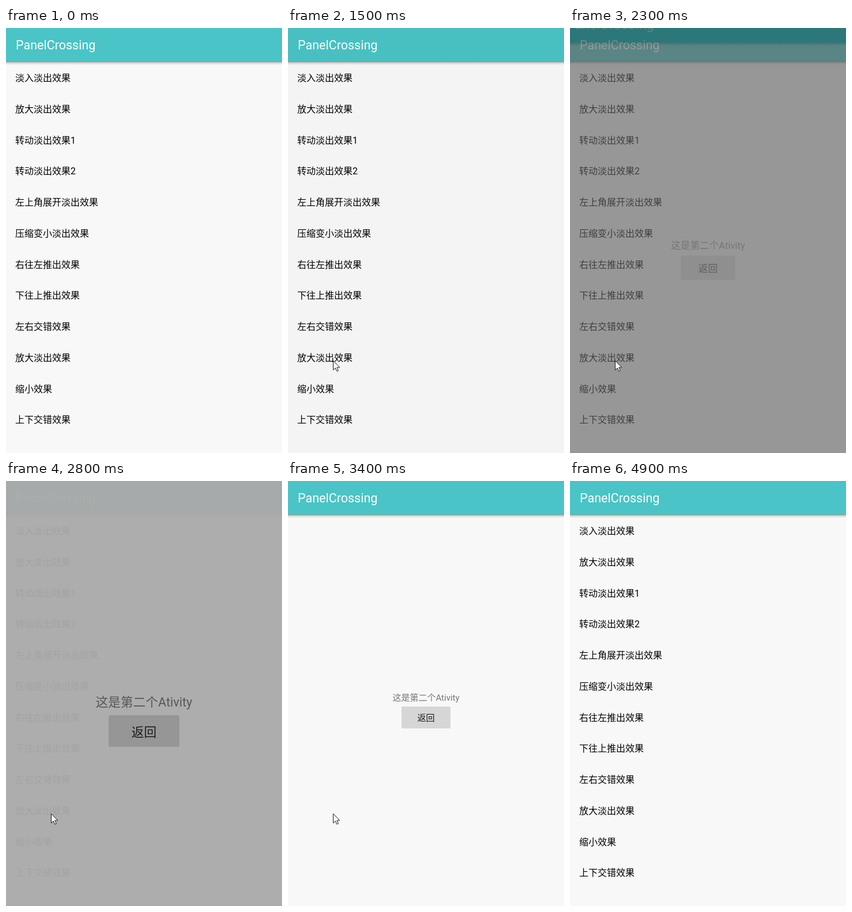
Animation of 479 by 735 pixels, one loop 5300 ms. Source, as an HTML page:

```html
<!DOCTYPE html>
<html lang="zh-CN">
<head>
<meta charset="utf-8">
<title>PanelCrossing</title>
<style>
  html, body { margin: 0; width: 100%; height: 100%; overflow: hidden; background: #000; }
  svg { display: block; width: 479px; height: 735px; }
  text { font-family: Roboto, "Noto Sans CJK SC", "Noto Sans CJK", sans-serif; white-space: pre; }
  .title { font-size: 21.5px; fill: #fff; }
  .item { font-size: 16px; fill: #000; }
  .note { font-size: 15px; fill: #757575; text-anchor: middle; }
  .label { font-size: 15px; font-weight: 500; fill: #1c1c1c; text-anchor: middle; }
</style>
</head>
<body>
<svg viewBox="0 0 479 735">
  <defs>
    <linearGradient id="shade" x2="0" y2="1">
      <stop offset="0" stop-opacity=".47"/>
      <stop offset=".3" stop-opacity=".16"/>
      <stop offset="1" stop-opacity="0"/>
    </linearGradient>
    <g id="frame">
      <rect y="-22" width="479" height="757" fill="#f8f8f8"/>
      <rect y="58" width="479" height="6" fill="url(#shade)"/>
      <rect y="-22" width="479" height="80" fill="#4ac4c6"/>
      <text class="title" x="17" y="37">PanelCrossing</text>
    </g>
  </defs>
  <rect width="479" height="735" fill="#000"/>
  <g id="list"><use href="#frame"/></g>
  <g id="detail">
    <use href="#frame"/>
    <text class="note" x="239.5" y="379.6">这是第二个Ativity</text>
    <rect id="button" x="197" y="390" width="85" height="38" rx="2"/>
    <text class="label" x="239.5" y="415.4">返回</text>
  </g>
  <path id="cursor" d="M.5 .5V16.5L4.2 13L6.8 18.6L9.3 17.5L6.8 12H11.8Z" fill="#fff" stroke="#16162c"/>
</svg>
<script>
const LOOP = 5300, STEP = 100;
const OPENED = 3300, PRESSED = 4200, CLOSING = 4300, CLOSED = 4900;
const $ = id => document.getElementById(id);
const list = $('list'), detail = $('detail'), button = $('button'), cursor = $('cursor');

const items = ['淡入淡出效果', '放大淡出效果', '转动淡出效果1', '转动淡出效果2',
  '左上角展开淡出效果', '压缩变小淡出效果', '右往左推出效果', '下往上推出效果',
  '左右交错效果', '放大淡出效果', '缩小效果', '上下交错效果'];

items.forEach((label, i) => {
  const row = document.createElementNS('http://www.w3.org/2000/svg', 'text');
  row.setAttribute('class', 'item');
  row.setAttribute('x', 16);
  row.setAttribute('y', Math.round(92 + 53.75 * i));
  row.textContent = label;
  list.append(row);
});

// Progress from 0 to 1 between two times
const span = (t, from, to) => Math.min(1, Math.max(0, (t - from) / (to - from)));
const mix = (a, b, p) => a + (b - a) * p;
const easeIn = p => p * p;
const easeOut = p => 1 - (1 - p) ** 2;
const easeInOut = p => (1 - Math.cos(Math.PI * p)) / 2;

// The list fades to black while the detail page zooms past full size and snaps back
function opening(t) {
  return {
    listAlpha: 1 - easeInOut(span(t, 1350, 3200)),
    alpha: easeIn(span(t, 1500, 3100)),
    scale: mix(.56, 1.605, span(t, 1480, 3040))
  };
}

// The detail page shrinks and fades over the list
function closing(t) {
  const p = span(t, CLOSING, CLOSED);
  return { listAlpha: 1, alpha: 1 - p, scale: mix(1, .89, p) };
}

function pointer(t) {
  const arrive = easeOut(span(t, 200, 800));
  const leave = span(t, 3700, PRESSED);
  return [mix(mix(470, 78, arrive), 230, leave), mix(mix(47, 575, arrive), 410, leave)];
}

function draw(t) {
  const { listAlpha, alpha, scale } = t < OPENED ? opening(t) : closing(t);
  list.setAttribute('opacity', listAlpha);
  detail.setAttribute('opacity', alpha);
  detail.setAttribute('transform',
    `translate(239.5 356.5) scale(${scale}) translate(-239.5 -356.5)`);
  button.setAttribute('fill', t >= PRESSED ? '#c9c9c9' : '#d6d6d6');
  cursor.setAttribute('transform', `translate(${pointer(t)})`);
  cursor.setAttribute('visibility', t >= 200 && t < 4700 ? 'visible' : 'hidden');
}

const start = performance.now();
function tick() {
  const t = (performance.now() - start) % LOOP;
  draw(Math.floor(t / STEP) * STEP);
  requestAnimationFrame(tick);
}
tick();
</script>
</body>
</html>
```
